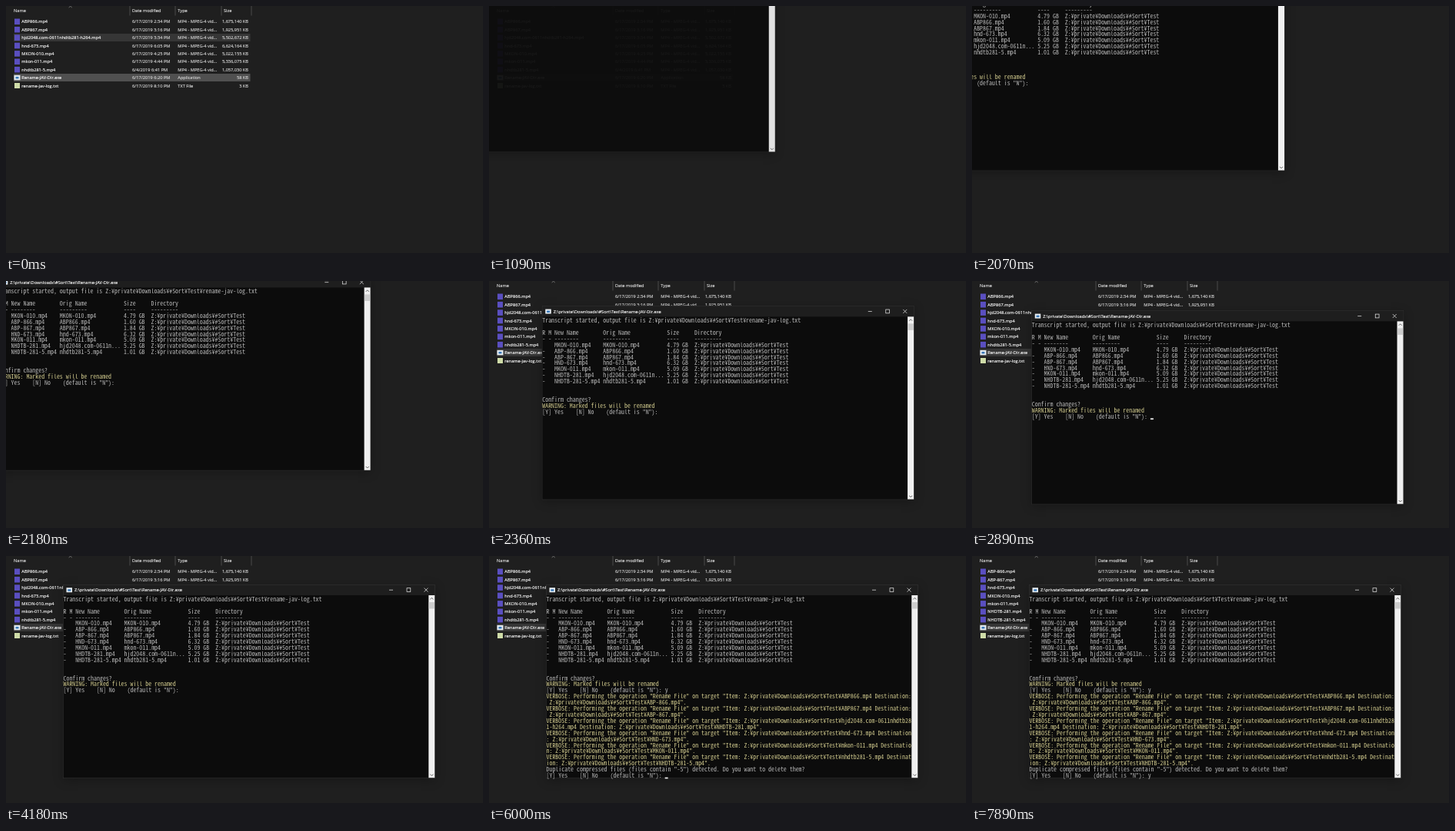
An HTML page with a canvas that plays this animation: 620x321 px, repeating every 8 s.

```html
<!DOCTYPE html>
<html lang="en">
<head>
<meta charset="utf-8">
<title>Batch rename</title>
<style>
html, body { margin: 0; width: 100%; height: 100%; overflow: hidden; background: #1f1f1f; }
canvas { display: block; }
</style>
</head>
<body>
<canvas id="stage" width="620" height="321"></canvas>
<script>
const ctx = document.getElementById('stage').getContext('2d');
const LOOP = 8000;
const UI = '"Open Sans", "Noto Sans", sans-serif';
const MONO = '"Noto Sans Mono CJK JP", "Noto Sans Mono", monospace';
const UI_SIZE = 5.65;
const CELL = 3.953, LINE = 7.906, COLS = 120;
const WIN = { x: 74, y: 37, w: 484, h: 252 };
const GRAY = '#b8b8b8', YELLOW = '#d2cb8e';

// Size the console font so that one character fills one cell.
ctx.font = `100px ${MONO}`;
const MONO_SIZE = CELL / ctx.measureText('0').width * 100;

const clamp = v => Math.max(0, Math.min(1, v));
const ramp = (t, a, b) => clamp((t - a) / (b - a));

// Text is laid out ten times larger, which keeps fractional advances.
// A hairline stroke gives the small type its weight.
function label(str, x, y, color, align = 'left', size = UI_SIZE) {
  ctx.save();
  ctx.translate(x, y);
  ctx.scale(.1, .1);
  ctx.font = `${size * 10}px ${UI}`;
  ctx.textAlign = align;
  ctx.fillStyle = ctx.strokeStyle = color;
  ctx.lineWidth = 1.6;
  ctx.lineJoin = 'round';
  ctx.fillText(str, 0, size * 3.6);
  ctx.strokeText(str, 0, size * 3.6);
  ctx.restore();
}

function rect(x, y, w, h, color) {
  ctx.fillStyle = color;
  ctx.fillRect(x, y, w, h);
}

function path(points, color, width = .7) {
  ctx.beginPath();
  points.forEach(([x, y]) => ctx.lineTo(x, y));
  ctx.strokeStyle = color;
  ctx.lineWidth = width;
  ctx.stroke();
}

// ---- file list ----
const video = (name, date, size) => ({ name, date, size, type: 'MP4 - MPEG-4 vid...', icon: 'video' });
const tail = [
  { name: 'Rename-JAV-Dir.exe', date: '6/17/2019 6:20 PM', size: '58 KB', type: 'Application', icon: 'app' },
  { name: 'rename-jav-log.txt', date: '6/17/2019 8:10 PM', size: '3 KB', type: 'TXT File', icon: 'text' }
];
const before = [
  video('ABP866.mp4', '6/17/2019 2:34 PM', '1,675,140 KB'),
  video('ABP867.mp4', '6/17/2019 3:16 PM', '1,925,951 KB'),
  video('hjd2048.com-0611nhdtb281-h264.mp4', '6/17/2019 3:34 PM', '5,502,672 KB'),
  video('hnd-673.mp4', '6/17/2019 6:05 PM', '6,624,164 KB'),
  video('MKON-010.mp4', '6/17/2019 4:25 PM', '5,022,155 KB'),
  video('mkon-011.mp4', '6/17/2019 4:44 PM', '5,336,075 KB'),
  video('nhdtb281-5.mp4', '6/4/2019 6:41 PM', '1,057,030 KB'),
  ...tail
];
const renamed = (i, name) => ({ ...before[i], name });
const after = [
  renamed(0, 'ABP-866.mp4'), renamed(1, 'ABP-867.mp4'),
  before[3], before[4], before[5],
  renamed(2, 'NHDTB-281.mp4'), renamed(6, 'NHDTB-281-5.mp4'),
  ...tail
];
const rowY = i => 20.3 + i * 10.4;

function fileIcon(kind, y) {
  if (kind === 'video') {
    rect(11, y - 3.8, 7, 7.6, '#5a4fc0');
  } else if (kind === 'app') {
    rect(10.5, y - 3.2, 8, 6.4, '#e8eef2');
    rect(12.5, y - 1.2, 4, 2.6, '#3a78b8');
  } else {
    rect(11, y - 3.5, 7, 7, '#cfdca8');
  }
}

function fileRows(rows, alpha) {
  ctx.globalAlpha = alpha;
  rows.forEach((f, i) => {
    const y = rowY(i);
    fileIcon(f.icon, y);
    label(f.name, 20.3, y, '#f4f4f4');
    label(f.date, 164, y, '#d0d0d0');
    label(f.type, 223.3, y, '#d0d0d0');
    label(f.size, 315, y, '#d0d0d0', 'right');
  });
  ctx.globalAlpha = 1;
}

function highlight(i, color, alpha) {
  ctx.globalAlpha = alpha;
  rect(10, rowY(i) - 5.1, 307.5, 10, color);
  ctx.globalAlpha = 1;
}

function explorer(t) {
  rect(0, 0, 620, 321, '#1f1f1f');
  [161, 220, 280, 319].forEach(x => rect(x - .5, 0, 1, 12.5, '#4a4a4a'));
  path([[81.7, 2], [83.7, 0.2], [85.7, 2]], '#999');
  [['Name', 10], ['Date modified', 164], ['Type', 223.3], ['Size', 283]]
    .forEach(([s, x]) => label(s, x, 6.3, '#d8d8d8'));

  const picked = ramp(t, 730, 840), blurred = ramp(t, 980, 1080);
  highlight(2, '#363636', 1 - picked);
  highlight(7, '#505050', 1 - blurred);
  highlight(7, '#777777', picked * (1 - blurred));
  highlight(7, '#363636', blurred);

  const swap = ramp(t, 7140, 7300);
  if (swap < 1) fileRows(before, 1 - swap);
  if (swap > 0) fileRows(after, swap);
}

// ---- console ----
const DIR = 'Z:¥private¥Downloads¥#Sort¥Test';
const PROMPT = '[Y] Yes    [N] No    (default is "N"): ';
const columns = (mark, name, orig, size, dir) =>
  mark.padEnd(4) + name.padEnd(16) + orig.padEnd(21) + size.padEnd(9) + dir;

const table = [
  ['MKON-010', 'MKON-010.mp4', '4.79'],
  ['ABP-866', 'ABP866.mp4', '1.60'],
  ['ABP-867', 'ABP867.mp4', '1.84'],
  ['HND-673', 'hnd-673.mp4', '6.32'],
  ['MKON-011', 'mkon-011.mp4', '5.09'],
  ['NHDTB-281', 'hjd2048.com-0611n...', '5.25'],
  ['NHDTB-281-5', 'nhdtb281-5.mp4', '1.01']
].map(([name, orig, size], i) => columns(i ? '-' : '', name + '.mp4', orig, size + ' GB', DIR));

const screen = [
  `Transcript started, output file is ${DIR}¥rename-jav-log.txt`,
  '',
  columns('R M', 'New Name', 'Orig Name', 'Size', 'Directory'),
  columns('- -', '--------', '---------', '----', '---------'),
  ...table,
  '', '',
  'Confirm changes?',
  'WARNING: Marked files will be renamed',
  PROMPT
];
const FIRST = screen.length;

const verbose = [
  ['ABP866', 'ABP-866'], ['ABP867', 'ABP-867'],
  ['hjd2048.com-0611nhdtb281-h264', 'NHDTB-281'], ['hnd-673', 'HND-673'],
  ['mkon-011', 'MKON-011'], ['nhdtb281-5', 'NHDTB-281-5']
];
verbose.forEach(([from, to]) => {
  const s = 'VERBOSE: Performing the operation "Rename File" on target ' +
    `"Item: ${DIR}¥${from}.mp4 Destination: ${DIR}¥${to}.mp4".`;
  screen.push(s.slice(0, COLS), s.slice(COLS));
});
screen.push('Duplicate compressed files (files contain "-5") detected. Do you want to delete them?', PROMPT);
const LAST = screen.length;
const isYellow = i => i === FIRST - 2 || (i >= FIRST && i < LAST - 2);

function visibleLines(t) {
  if (t < 1260) return 0;
  if (t < 1340) return 1;
  if (t < 1480) return Math.min(FIRST, 2 + Math.floor((t - 1340) / 10));
  if (t < 5610) return FIRST;
  return Math.min(LAST, FIRST + 1 + Math.floor((t - 5610) / 28));
}

function consoleLine(str, row) {
  ctx.fillStyle = isYellow(row) ? YELLOW : GRAY;
  const y = (19.1 + row * LINE + MONO_SIZE * .34) * 10;
  [...str].forEach((c, i) => {
    if (c !== ' ') ctx.fillText(c, (.5 + i * CELL) * 10, y);
  });
}

const within = (t, spans) => spans.some(([a, b]) => t >= a && t < b);

function cursor(t) {
  const on = within(t, [[1480, 2050], [2580, 3110], [3640, 4180], [4300, 4700],
    [5230, 5610], [6000, 6820], [7340, 7890]]);
  if (!on) return;
  const row = t < 5610 ? FIRST - 1 : LAST - 1;
  const typed = (t >= 4300 && t < 5610) || t >= 7660;
  const col = PROMPT.length + (typed ? 1 : 0);
  rect(.5 + col * CELL, 19.1 + row * LINE + 2.3, CELL, 1.7, '#f2f2f2');
}

// Drag path of the window: time, x and y offset from its resting place.
const drag = [
  [2020, -184, -98], [2070, -152, -75], [2200, -72, -37], [2360, -5.3, -4.7],
  [2520, 4, 2], [2770, 8, 5], [2860, 8, 5], [2890, 3.3, 1.4],
  [3000, -1.5, 0.3], [3110, 0, 0]
];

function offset(t) {
  if (t <= drag[0][0]) return drag[0].slice(1);
  const k = drag.findIndex(p => p[0] > t);
  if (k < 0) return [0, 0];
  const [a, b] = [drag[k - 1], drag[k]];
  const u = ramp(t, a[0], b[0]);
  return [1, 2].map(i => a[i] + (b[i] - a[i]) * u);
}

function frame() {
  const { w, h } = WIN;
  ctx.save();
  ctx.shadowColor = 'rgba(0,0,0,.25)';
  ctx.shadowBlur = 12;
  ctx.shadowOffsetY = 3;
  rect(0, 0, w, h, '#0c0c0c');
  ctx.restore();
  rect(0, 0, w, 14, '#1e1e1e');

  rect(4.5, 4.2, 7.5, 6, '#e8eef2');
  rect(6.3, 6.2, 4, 2.5, '#3a78b8');
  label('Z:\\private\\Downloads\\#Sort\\Test\\Rename-JAV-Dir.exe', 15, 7.2, '#f0f0f0');

  path([[424, 7.2], [429, 7.2]], '#eee');
  ctx.strokeRect(447, 4.7, 4.8, 4.8);
  path([[469.5, 4.6], [474.5, 9.6]], '#eee');
  path([[474.5, 4.6], [469.5, 9.6]], '#eee');

  rect(475.3, 14, 8.2, h - 14.5, '#f0f0f0');
  rect(475.6, 23, 7.6, 8.5, '#cdcdcd');
  path([[477.4, 19.4], [479.4, 17.4], [481.4, 19.4]], '#555', .9);
  path([[477.4, h - 5.4], [479.4, h - 3.4], [481.4, h - 5.4]], '#555', .9);

  ctx.strokeStyle = '#333';
  ctx.lineWidth = .6;
  ctx.strokeRect(.3, .3, w - .6, h - .6);
}

function terminal(t) {
  if (t < 980) return;
  const open = 1 - Math.pow(1 - ramp(t, 960, 1180), 3);
  const [dx, dy] = offset(t);
  ctx.save();
  ctx.translate(WIN.x + dx + WIN.w / 2, WIN.y + dy + WIN.h / 2);
  ctx.scale(.9 + .1 * open, .9 + .1 * open);
  ctx.translate(-WIN.w / 2, -WIN.h / 2);
  ctx.globalAlpha = open;
  frame();

  ctx.save();
  ctx.scale(.1, .1);
  ctx.font = `${MONO_SIZE * 10}px ${MONO}`;
  ctx.textAlign = 'left';
  screen.slice(0, visibleLines(t)).forEach(consoleLine);
  const answer = ' '.repeat(PROMPT.length) + 'y';
  if (t >= 4300) consoleLine(answer, FIRST - 1);
  if (t >= 7660) consoleLine(answer, LAST - 1);
  ctx.restore();

  cursor(t);
  ctx.restore();
}

const start = performance.now();
function draw() {
  const t = (performance.now() - start) % LOOP;
  explorer(t);
  terminal(t);
  requestAnimationFrame(draw);
}
draw();
</script>
</body>
</html>
```
